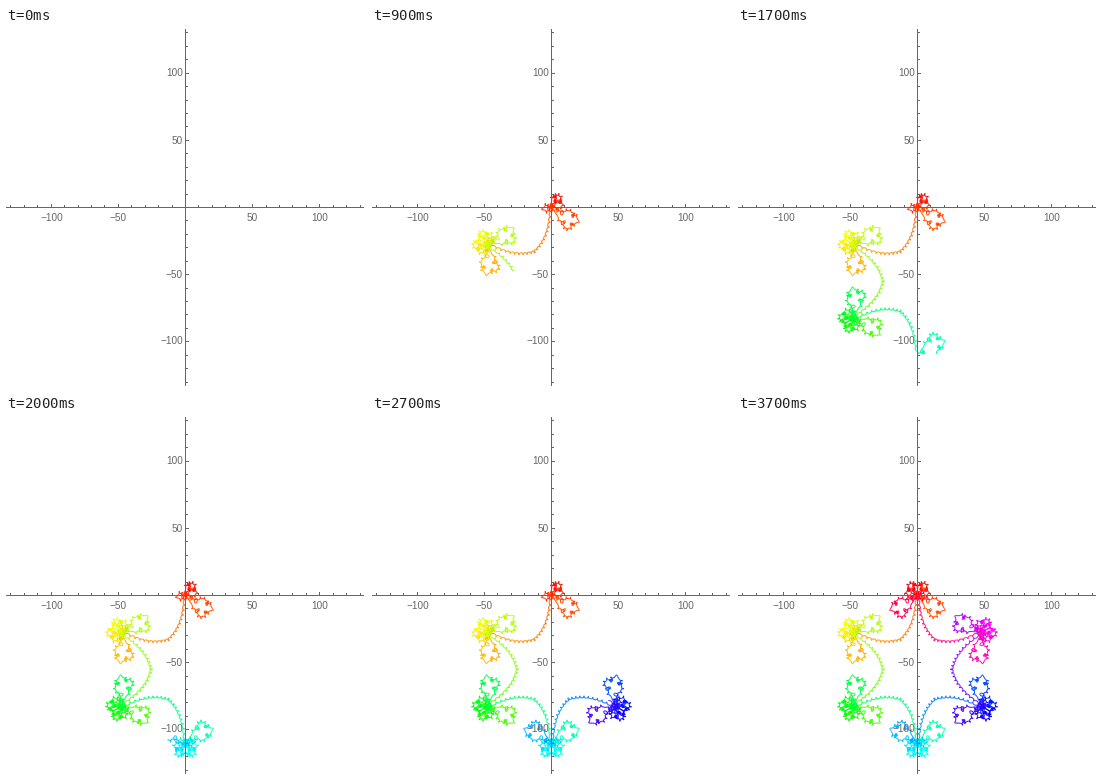
Write a matplotlib script that moves like this. It is 360x360 px and loops after 3.8 s.

```python
import numpy as np
import matplotlib.pyplot as plt
from matplotlib.animation import FuncAnimation
from matplotlib.collections import LineCollection
from matplotlib.colors import hsv_to_rgb

SIZE, DPI = 360, 72
ORIGIN, SCALE = 179.5, 1.343      # pixels, pixels per unit
FRAMES, INTERVAL = 38, 100
HALF = 420                        # steps from a cluster's heart to the next bend
HUB = -55j                        # centre of the six-fold symmetry
BEND = HUB + 25 * np.exp(2j * np.pi / 3)
INK = "#666666"

# Arms of half a cluster: share of steps, reach, direction in degrees
ARMS = [(.18, 9.5, 62), (.14, 9, 30), (.10, 5, 185), (.32, 21, -35)]


def arm(steps, reach, degrees):
    """Leaf-shaped trip out from the heart and back."""
    v = np.arange(steps) / steps
    angle = np.radians(degrees) + .35 * np.sin(2 * np.pi * v)
    return reach * np.sin(np.pi * v) * np.exp(1j * angle)


def curls(steps):
    n = np.arange(steps)
    fine = np.exp(1j * (1.1 * n + 2 * np.sin(.31 * n)))
    wide = 1.8 * np.exp(-.27j * n)
    return np.clip(n / 10, 0, 1) * (fine + wide)


def strand(steps, waves=10):
    """Wavy curve from the heart to the bend."""
    v = np.linspace(0, 1, steps)
    curve = 2 * v * (1 - v) * (-1 - 24j) + v**2 * BEND - 3j * (1 - v)**2
    return curve + .8 * (np.exp(2j * np.pi * waves * v) - 1)


def full_curve():
    cluster = np.concatenate([arm(int(share * HALF), reach, degrees)
                              for share, reach, degrees in ARMS])
    cluster = cluster + curls(len(cluster))
    half = np.append(cluster, strand(HALF + 1 - len(cluster))) - HUB
    mirrored = np.exp(4j * np.pi / 3) * np.conj(half[::-1])
    sixth = np.concatenate([half[:-1], mirrored[:-1]])
    turns = np.exp(1j * np.pi / 3 * np.arange(6))
    loop = (turns[:, None] * sixth).ravel()
    return np.append(loop, loop[0]) + HUB


def to_pixels(z):
    return np.column_stack([ORIGIN + SCALE * z.real, ORIGIN - SCALE * z.imag])


def draw_axes(ax):
    style = dict(color=INK, lw=1, zorder=3, solid_capstyle="butt", snap=False)
    ax.plot([0, 358], [ORIGIN, ORIGIN], **style)
    ax.plot([ORIGIN, ORIGIN], [1, 358], **style)
    font = dict(family="Liberation Sans", size=10, color=INK,
                va="center", zorder=3)
    for value in range(-130, 131, 10):
        if value == 0:
            continue
        major = value % 50 == 0
        length = 3.5 if major else 2.5
        x = np.floor(ORIGIN + SCALE * value) + .5
        y = np.floor(ORIGIN - SCALE * value) + .5
        ax.plot([x, x], [ORIGIN, ORIGIN - length], **style)
        ax.plot([ORIGIN, ORIGIN + length], [y, y], **style)
        if major:
            label = str(value).replace("-", "\u2212")
            ax.text(x, 189.7, label, ha="center", **font)
            ax.text(176.8, y, label, ha="right", **font)


fig = plt.figure(figsize=(SIZE / DPI, SIZE / DPI), dpi=DPI, facecolor="white")
ax = fig.add_axes([0, 0, 1, 1])
ax.set_xlim(0, SIZE)
ax.set_ylim(SIZE, 0)
ax.axis("off")
draw_axes(ax)

points = to_pixels(full_curve())
segments = np.stack([points[:-1], points[1:]], axis=1)
total = len(segments)
hues = np.arange(total) / total
colors = hsv_to_rgb(np.column_stack([hues, np.ones(total), np.ones(total)]))
trail = LineCollection([], linewidths=1, zorder=2)
ax.add_collection(trail, autolim=False)


def update(frame):
    count = total * frame // (FRAMES - 1)
    trail.set_segments(segments[:count])
    trail.set_color(colors[:count])
    return [trail]


anim = FuncAnimation(fig, update, frames=FRAMES, interval=INTERVAL,
                     repeat=True, repeat_delay=0)
plt.show()
```
